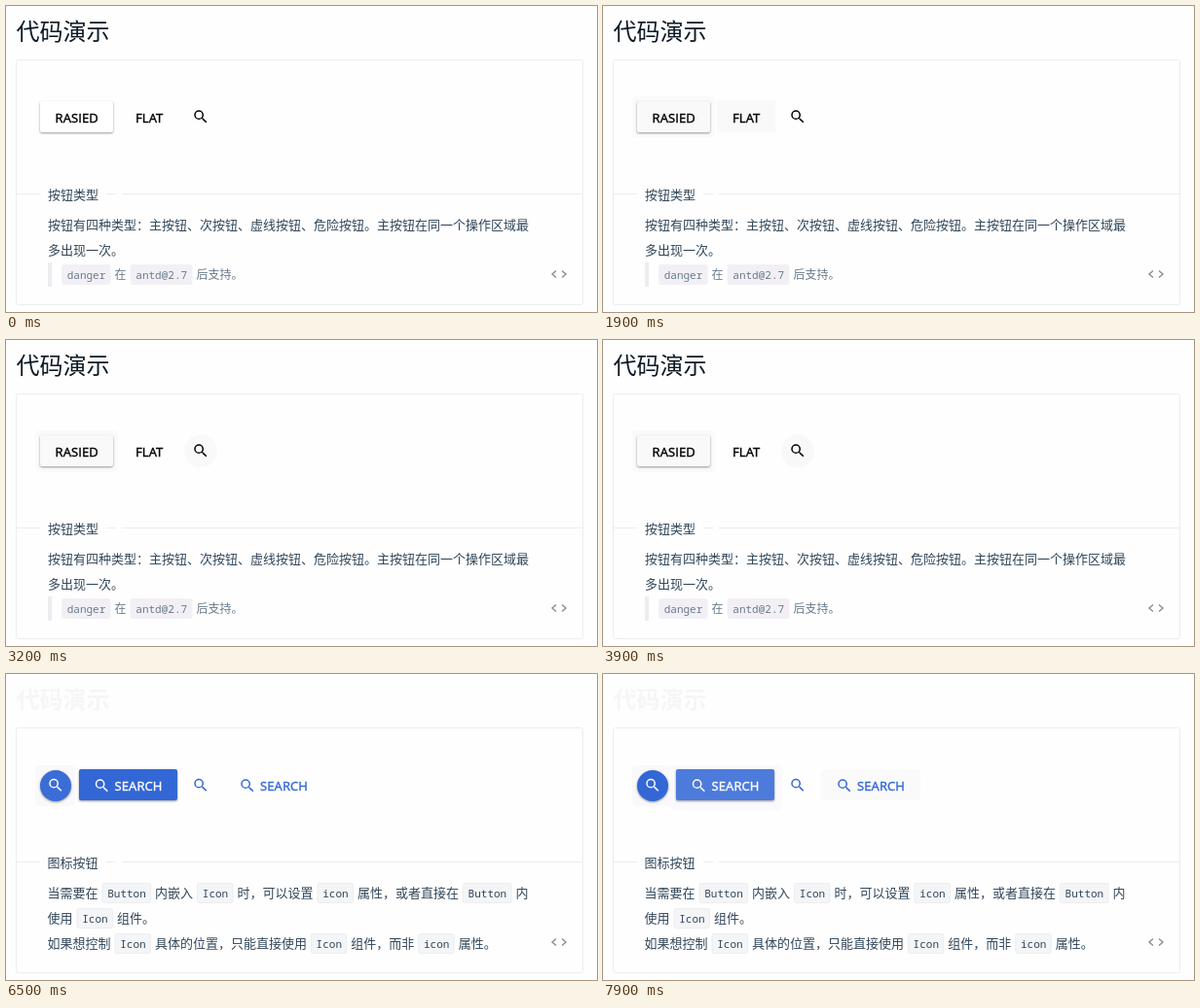
Write an HTML page that moves like this. It is 607 by 315 pixels and loops after 8 s.

```html
<!DOCTYPE html>
<html lang="zh-CN">
<head>
<meta charset="utf-8">
<style>
  html, body { margin: 0; height: 100%; overflow: hidden; background: #fefefe; }
  svg { display: block; width: 607px; height: 315px; }
  text { font-family: 'Noto Sans CJK SC', 'Noto Sans CJK', sans-serif; fill: #314659; white-space: pre; }
  .code { font: 11px 'Noto Sans Mono', monospace; }
  .label { font: 13px 'Open Sans', sans-serif; letter-spacing: .1px; stroke-width: .4px; }
  .raised { filter: drop-shadow(0 1.3px 1.1px rgba(0, 0, 0, .4)); }
  .line { fill: none; stroke: #ebedf0; }
</style>
</head>
<body>
<svg id="stage" viewBox="0 0 607 315"></svg>
<script>
const BLUE = '#3367d6';
const SEARCH = 'M15.5 14h-.79l-.28-.27A6.47 6.47 0 0 0 16 9.5 6.5 6.5 0 1 0 9.5 16c1.61 0 3.09-.59 4.23-1.57l.27.28v.79l5 4.99L20.49 19zm-6 0a4.5 4.5 0 1 1 0-9 4.5 4.5 0 0 1 0 9z';

const text = (x, y, str, size, attrs = '') => `<text x="${x}" y="${y}" font-size="${size}" ${attrs}>${str}</text>`;
const rect = (x, y, w, h, fill, attrs = '') => `<rect x="${x}" y="${y}" width="${w}" height="${h}" fill="${fill}" ${attrs}/>`;
const circle = (x, y, r, fill, attrs = '') => `<circle cx="${x}" cy="${y}" r="${r}" fill="${fill}" ${attrs}/>`;
const label = (x, str, color) => `<text class="label" x="${x}" y="120" style="fill:${color};stroke:${color}">${str}</text>`;
const icon = (cx, cy, color) => `<path d="${SEARCH}" fill="${color}" transform="translate(${cx - 9} ${cy - 9}) scale(.75)"/>`;

// Lays out a line of text in which `...` marks inline code.
function row(x, y, str, { size = 13, color = '#314659', tag = '#f4f5f7', edge = '#ededf0' } = {}) {
  return str.split('`').map((part, i) => {
    if (!part) return '';
    const start = x;
    if (i % 2 === 0) {
      x += part.length * size;
      return text(start, y, part, size, `style="fill:${color}"`);
    }
    const width = part.length * 6.6 + 11;
    x += width + 8;
    return rect(start + 4.5, y - 14.5, width - 1, 20, tag, `rx="2" stroke="${edge}"`) +
      `<text class="code" x="${start + 9.7}" y="${y - .5}" style="fill:${color}">${part}</text>`;
  }).join('');
}

const frame = title => `
  <rect class="line" x="10.5" y="55.5" width="582" height="252" rx="2"/>
  <path class="line" d="M11 193.5H35M103 193.5H113M119 193.5H592"/>
  ${title}
  <path d="M565 272.5l-4 3.5 4 3.5M571 272.5l4 3.5-4 3.5" fill="none" stroke="#8c9094" stroke-width="1.5"/>`;

document.getElementById('stage').innerHTML = `
<g id="types">
  ${text(10.6, 35, '代码演示', 24, 'style="fill:#0d1a26"')}
  ${frame(text(43, 199, '按钮类型', 13))}
  ${rect(30, 93, 85, 43, '#fafafa', 'id="halo" rx="4"')}
  ${rect(35, 98, 75, 32, '#fff', 'class="raised" rx="2"')}
  ${rect(35, 98, 75, 32, '#000', 'id="raisedInk" rx="2"')}
  ${label(50.5, 'RASIED', '#000')}
  ${rect(117, 97, 60, 33, '#000', 'id="flatInk" rx="1"')}
  ${label(133, 'FLAT', '#000')}
  ${circle(200, 114.5, 17, '#000', 'id="iconInk"')}
  ${icon(200, 114, '#000')}
  ${row(43, 230, '按钮有四种类型：主按钮、次按钮、虚线按钮、危险按钮。主按钮在同一个操作区域最')}
  ${row(43, 256, '多出现一次。')}
  ${rect(43, 264, 4, 25, '#ebedf0')}
  ${row(53, 281, '`danger`在`antd@2.7`后支持。', { size: 12, color: '#697b8c', tag: '#f2f0f5', edge: '#f2f0f5' })}
</g>
<g id="icons">
  ${text(10.6, 35, '代码演示', 24, 'font-weight="700" style="fill:#f6f6f6"')}
  ${frame(text(42.5, 199, '图标按钮', 13))}
  ${rect(30, 94, 41, 42, '#f9f8fb', 'rx="4"')}
  ${circle(51, 115, 16, BLUE, 'class="raised"')}
  ${circle(51, 115, 16, '#fff', 'id="roundInk"')}
  ${icon(51, 114.5, '#fff')}
  ${rect(69, 93, 115, 48, '#faf9fb', 'id="searchHalo" rx="5"')}
  ${rect(75, 98, 101, 32, BLUE, 'class="raised" rx="2"')}
  ${rect(75, 98, 101, 32, '#fff', 'id="searchInk" rx="2"')}
  ${icon(98.5, 115, '#fff')}
  ${label(111.5, 'SEARCH', '#fff')}
  ${icon(200, 114.5, BLUE)}
  ${rect(224, 98, 102, 32, '#000', 'id="linkInk" rx="2"')}
  ${icon(248, 115, BLUE)}
  ${label(261, 'SEARCH', BLUE)}
  ${row(42.5, 230, '当需要在`Button`内嵌入`Icon`时，可以设置`icon`属性，或者直接在`Button`内')}
  ${row(42.5, 256, '使用`Icon`组件。')}
  ${row(42.5, 282, '如果想控制`Icon`具体的位置，只能直接使用`Icon`组件，而非`icon`属性。')}
</g>`;

// Opacity tracks as [time, value] points, linear in between.
const tracks = {
  halo: [[700, 0], [900, 1]],
  raisedInk: [[700, 0], [900, .04], [1000, .06], [1200, .115], [1500, .025]],
  flatInk: [[1800, 0], [2000, .04], [2100, .06], [2300, .15], [2400, .15], [2500, .04], [2600, .04], [2700, 0]],
  iconInk: [[3100, 0], [3300, .04], [3500, .13], [3600, .09], [3700, .09], [3900, .024]],
  roundInk: [[6400, 0], [6700, .13], [7000, .13], [7200, 0]],
  searchInk: [[7300, 0], [7600, .13]],
  searchHalo: [[7300, 0], [7600, 1]],
  linkInk: [[7700, 0], [7900, .015]],
};

function valueAt(points, t) {
  const next = points.findIndex(([time]) => time > t);
  if (next < 0) return points[points.length - 1][1];
  if (next === 0) return points[0][1];
  const [t0, v0] = points[next - 1], [t1, v1] = points[next];
  return v0 + (v1 - v0) * (t - t0) / (t1 - t0);
}

const byId = id => document.getElementById(id);

function draw() {
  const t = Math.floor(performance.now() % 8000 / 100) * 100;
  byId('types').style.display = t < 5300 ? '' : 'none';
  byId('icons').style.display = t < 5300 ? 'none' : '';
  for (const id in tracks) byId(id).style.opacity = valueAt(tracks[id], t);
  requestAnimationFrame(draw);
}
draw();
</script>
</body>
</html>
```
